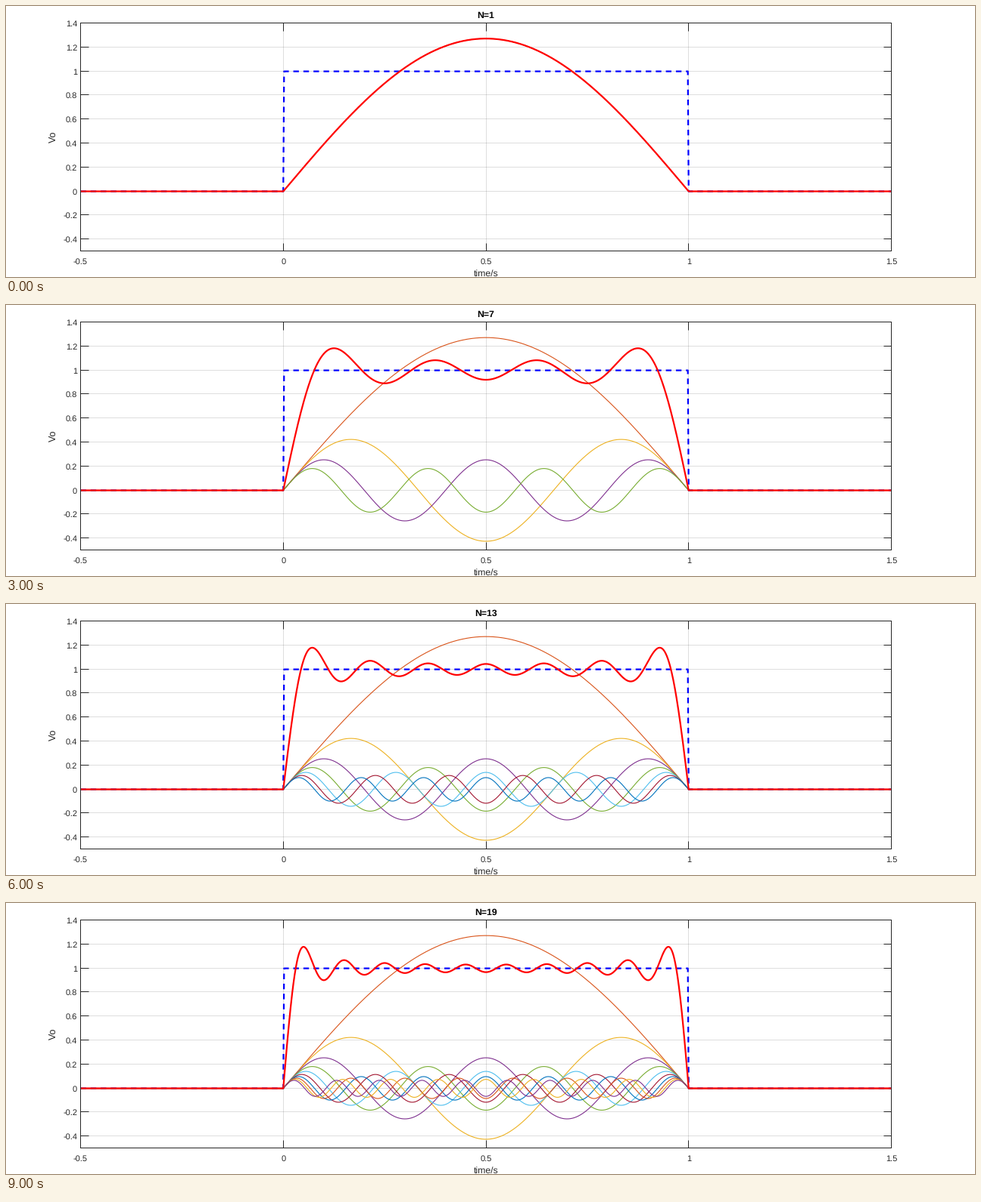
Write a matplotlib script that moves like this. It is 1280 by 359 pixels and loops after 10 s.

```python
import numpy as np
import matplotlib.pyplot as plt
from matplotlib.animation import FuncAnimation
from matplotlib.transforms import ScaledTranslation

W, H, DPI = 1280, 359, 64
PX = 72 / DPI  # points per pixel
LEFT, RIGHT, TOP, BOTTOM = 98, 1169, 22, 324
INK = "#262626"
COLORS = ["#D95319", "#EDB120", "#7E2F8E", "#77AC30",
          "#4DBEEE", "#A2142F", "#0072BD"]
STEPS = 10

plt.rcParams["font.family"] = "Liberation Sans"
plt.rcParams["text.hinting"] = "none"
plt.rcParams["text.kerning_factor"] = 6
plt.rcParams["lines.scale_dashes"] = False

fig = plt.figure(figsize=(W / DPI, H / DPI), dpi=DPI, facecolor="white")
ax = fig.add_axes([LEFT / W, 1 - BOTTOM / H, (RIGHT - LEFT) / W, (BOTTOM - TOP) / H])
ax.set(xlim=(-0.5, 1.5), ylim=(-0.5, 1.4))
xticks = np.arange(-1, 4) / 2
yticks = np.arange(-2, 8) / 5
ax.set_xticks(xticks)
ax.set_yticks(yticks)
ax.set_axisbelow(True)
ax.grid(color=INK, alpha=0.15, lw=PX)
ax.tick_params(direction="in", length=10.5 * PX, width=PX, color=INK,
               top=True, right=True, labelbottom=False, labelleft=False)
for spine in ax.spines.values():
    spine.set(color=INK, linewidth=PX)


def label(x, y, text, size=11, ha="center", **kw):
    kw = {"color": INK, "va": "baseline", **kw}
    return fig.text(x / W, 1 - y / H, text, fontsize=size * PX, ha=ha, **kw)


for v in xticks:
    label(LEFT + 0.5 + (v + 0.5) / 2 * (RIGHT - LEFT), 341.5, f"{v:g}")
for v in yticks:
    label(94, BOTTOM - (v + 0.5) / 1.9 * (BOTTOM - TOP) + 5, f"{v:g}", ha="right")
label(634, 358, "time/s", 12.3)
label(63.5, 173, "Vo", 12.6, rotation=90, va="center")
title = label(634, 16, "", 12.2, weight="bold", color="black")

t = np.linspace(-0.5, 1.5, 2001)
inside = (t > 0) & (t < 1)
# The frame snaps to whole pixels; curves run through pixel centres.
centred = ax.transData + ScaledTranslation(0.5 / DPI, -1 / DPI, fig.dpi_scale_trans)


def curve(x, y, color, width, **kw):
    return ax.plot(x, y, color=color, lw=width * PX, transform=centred, **kw)[0]


def harmonic(n):
    return np.where(inside, 4 / (np.pi * n) * np.sin(n * np.pi * t), 0)


waves = [harmonic(2 * k + 1) for k in range(STEPS)]
sums = np.cumsum(waves, axis=0)

curve([-0.5, 0, 0.002, 0.998, 1, 1.5], [0, 0, 1, 1, 0, 0], "blue", 2.2,
      dashes=(7.4 * PX, 5.9 * PX), dash_capstyle="butt")
thin = [curve(t, w, COLORS[k % len(COLORS)], 1.1) for k, w in enumerate(waves)]
total = curve(t, sums[0], "red", 2.2)


def update(i):
    title.set_text(f"N={2 * i + 1}")
    for k, line in enumerate(thin):
        line.set_visible(k <= i)
    total.set_ydata(sums[i])
    return [title, total, *thin]


anim = FuncAnimation(fig, update, frames=STEPS, interval=1000,
                     repeat=True, repeat_delay=0, blit=False)
plt.show()
```
